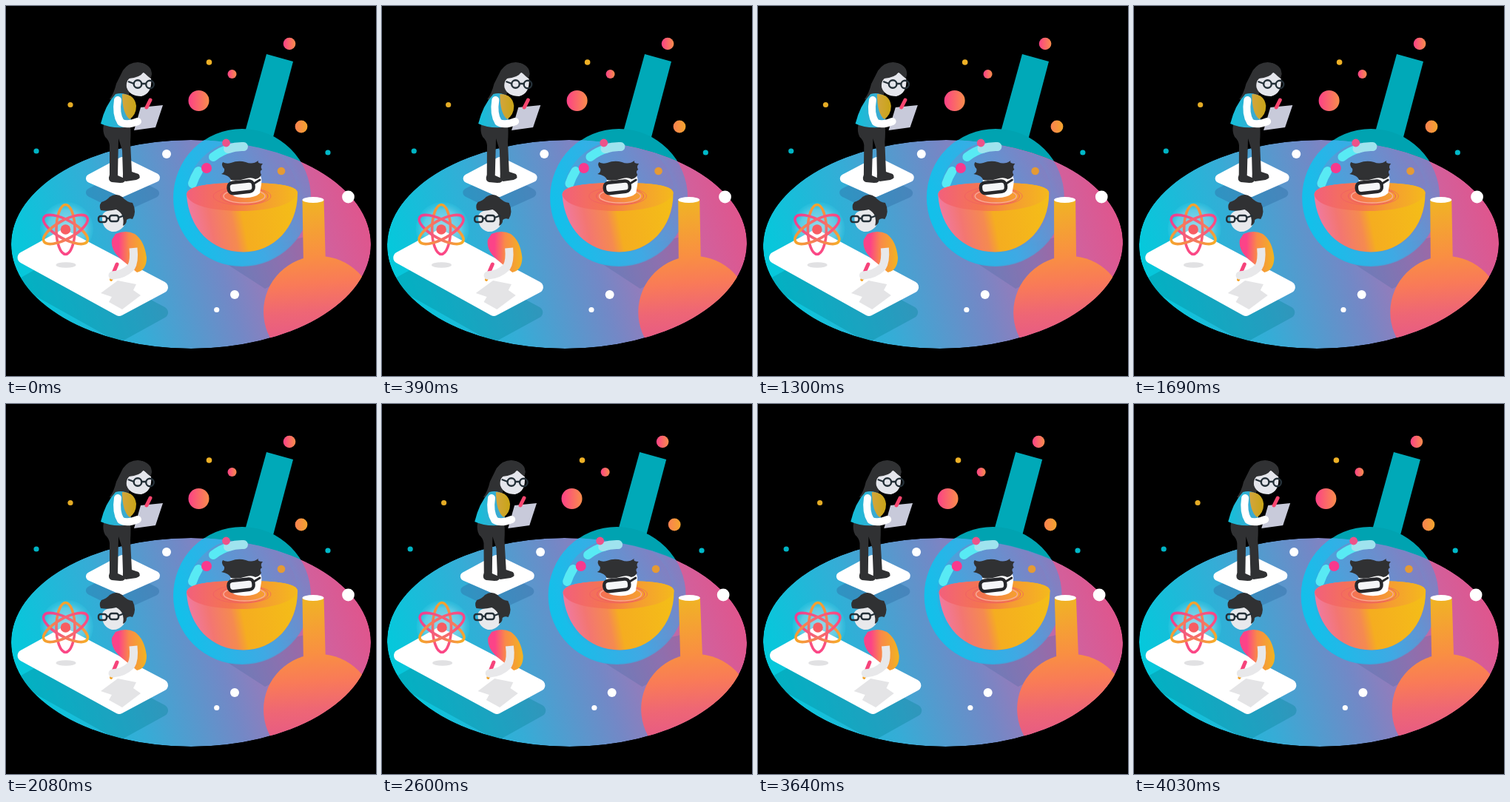
Recreate the animation shown at these times as an HTML page. Size 500x500 px, loop 4.16 s.

```html
<!DOCTYPE html>
<html lang="en">
<head>
<meta charset="utf-8">
<title>Laboratory</title>
<style>
html, body { margin: 0; width: 100%; height: 100%; overflow: hidden; background: #000; }
svg { display: block; width: 100vw; height: 100vh; }
.dark { fill: #303133; }
.rim { fill: none; stroke: #243038; }
.round { stroke-linecap: round; stroke-linejoin: round; }
.line { fill: none; stroke-linecap: round; stroke-linejoin: round; }
</style>
</head>
<body>
<svg viewBox="0 0 500 500">
  <defs>
    <linearGradient id="floor" gradientUnits="userSpaceOnUse" x1="15" y1="380" x2="470" y2="230">
      <stop offset="0" stop-color="#00cbdc"/>
      <stop offset=".3" stop-color="#36acd6"/>
      <stop offset=".56" stop-color="#7388c6"/>
      <stop offset=".74" stop-color="#a974b4"/>
      <stop offset=".87" stop-color="#d2609c"/>
      <stop offset="1" stop-color="#e0558c"/>
    </linearGradient>
    <linearGradient id="glass" gradientUnits="userSpaceOnUse" x1="240" y1="300" x2="395" y2="205">
      <stop offset="0" stop-color="#16bce9"/>
      <stop offset=".4" stop-color="#4aa2dc" stop-opacity=".9"/>
      <stop offset="1" stop-color="#7483c8" stop-opacity=".75"/>
    </linearGradient>
    <linearGradient id="ring" gradientUnits="userSpaceOnUse" x1="235" y1="285" x2="400" y2="235">
      <stop offset="0" stop-color="#13c0ea"/>
      <stop offset=".55" stop-color="#3fa9e4"/>
      <stop offset="1" stop-color="#6890d0" stop-opacity=".1"/>
    </linearGradient>
    <linearGradient id="liquid" gradientUnits="userSpaceOnUse" x1="246" y1="290" x2="390" y2="262">
      <stop offset="0" stop-color="#f07aa6"/>
      <stop offset=".2" stop-color="#f37672"/>
      <stop offset=".4" stop-color="#f58a50"/>
      <stop offset=".5" stop-color="#f5ad20"/>
      <stop offset="1" stop-color="#f4bd18"/>
    </linearGradient>
    <linearGradient id="surface">
      <stop offset="0" stop-color="#f2607c"/>
      <stop offset=".4" stop-color="#f4764e"/>
      <stop offset=".65" stop-color="#f59a34"/>
      <stop offset="1" stop-color="#f4b91c"/>
    </linearGradient>
    <linearGradient id="flask" gradientUnits="userSpaceOnUse" x1="410" y1="262" x2="425" y2="450">
      <stop offset="0" stop-color="#f0b424"/>
      <stop offset=".4" stop-color="#f98f42"/>
      <stop offset=".6" stop-color="#f97a58"/>
      <stop offset=".8" stop-color="#ee6675"/>
      <stop offset="1" stop-color="#e65a86"/>
    </linearGradient>
    <linearGradient id="warm">
      <stop offset="0" stop-color="#fc4187"/>
      <stop offset="1" stop-color="#f98d4c"/>
    </linearGradient>
    <linearGradient id="amber">
      <stop offset="0" stop-color="#fa8152"/>
      <stop offset="1" stop-color="#f4a52c"/>
    </linearGradient>
    <linearGradient id="shirt">
      <stop offset=".2" stop-color="#fc4388"/>
      <stop offset=".5" stop-color="#f98a48"/>
      <stop offset="1" stop-color="#f1b420"/>
    </linearGradient>
    <linearGradient id="vest">
      <stop offset="0" stop-color="#d3a53e"/>
      <stop offset="1" stop-color="#c9a516"/>
    </linearGradient>
    <linearGradient id="coat">
      <stop offset="0" stop-color="#12c0da"/>
      <stop offset="1" stop-color="#46a5cf"/>
    </linearGradient>
    <linearGradient id="orbit" gradientUnits="userSpaceOnUse" x1="46" y1="0" x2="114" y2="0">
      <stop offset="0" stop-color="#f5a52b"/>
      <stop offset=".5" stop-color="#f66b6c"/>
      <stop offset="1" stop-color="#fb4687"/>
    </linearGradient>
    <linearGradient id="orbit2" gradientUnits="userSpaceOnUse" x1="46" y1="0" x2="114" y2="0">
      <stop offset="0" stop-color="#ee3d92"/>
      <stop offset=".5" stop-color="#f56178"/>
      <stop offset="1" stop-color="#f6ac28"/>
    </linearGradient>
    <radialGradient id="glow">
      <stop offset="0" stop-color="#b4e2ee" stop-opacity=".85"/>
      <stop offset=".7" stop-color="#7fd6ea" stop-opacity=".65"/>
      <stop offset="1" stop-color="#2fc6e2" stop-opacity=".3"/>
    </radialGradient>
    <clipPath id="disc"><ellipse cx="250" cy="322" rx="243" ry="141"/></clipPath>
  </defs>
  <rect width="500" height="500"/>

  <!-- tall flask behind the disc -->
  <path data-m="5.4 0" fill="#00a9b8" d="M352 65L388 75L360 181L320 181Z"/>
  <circle data-m="2.3 0" cx="319" cy="259" r="93" fill="#00a3b1"/>

  <!-- disc with shadows -->
  <g data-m="0 .034" clip-path="url(#disc)">
    <ellipse cx="250" cy="322" rx="243" ry="141" fill="url(#floor)"/>
    <g class="round" opacity=".32">
      <path fill="#007f90" stroke="#007f90" stroke-width="16" d="M24 374L78 344L211 414L153 446Z"/>
    </g>
    <g class="round" opacity=".42">
      <path fill="#2f6fa5" stroke="#2f6fa5" stroke-width="12" d="M114 252L157 230L201 253L157 273Z"/>
    </g>
    <path fill="#47659f" opacity=".28" d="M285 340L350 382L412 352L404 312Z"/>
  </g>

  <!-- round bowl -->
  <g data-m="2 0">
    <g clip-path="url(#disc)">
      <circle cx="319" cy="259" r="93" fill="url(#glass)"/>
    </g>
    <circle cx="319" cy="258" r="84" fill="none" stroke="url(#ring)" stroke-width="17" clip-path="url(#disc)"/>
  </g>
  <g data-m="2.6 0" class="line" stroke="#58eaf4" stroke-width="12">
    <path d="M252 240Q255 231 260 223"/>
    <path d="M280 204Q290 196 303 192.5"/>
    <path d="M300 193Q311 189.5 321 190" stroke="#9fe3ee"/>
  </g>
  <g data-m="-.8 0">
    <path fill="url(#liquid)" d="M244 255C244 242 280 239 319 239S394 241 394 253C394 300 361 332.500 321 332.500C277 332.500 247 300 244 255Z"/>
    <path fill="url(#surface)" d="M244 255C244 242 280 239 319 239S394 241 394 253C390 268 356 277 319 277S248 271 244 255Z"/>
    <g fill="none" stroke="#ee5a66">
      <ellipse cx="319" cy="257" rx="39" ry="12" opacity=".6"/>
      <ellipse cx="322" cy="257" rx="28" ry="9" stroke="#f9a79a" stroke-width="1.5"/>
      <ellipse cx="322" cy="257" rx="32" ry="11"/>
    </g>
  </g>
  <g data-m=".4 0">
    <path fill="#fff" d="M304 230L341 226Q347 231 345 241L343 253Q336 260 319 259Q305 258 302 251Z"/>
    <path class="dark" d="M304 235Q302 229 291 227Q296 225 295 220Q290 215 293 211Q298 214 304 212Q314 208 324 211Q333 215 341 209Q339 213 347 213Q343 217 346 221Q342 223 345 228Q343 233 337 234Q332 231 325 233Q313 237 304 235Z"/>
    <rect x="300.500" y="237.500" width="34" height="14.500" rx="6" fill="#f5f6f8" stroke="#26272b" stroke-width="4.500" transform="rotate(-6 318 244)"/>
    <path class="line" stroke="#26272b" stroke-width="3" d="M335 240L343 235"/>
  </g>

  <!-- front flask -->
  <g data-m="0 .034" clip-path="url(#disc)">
    <g data-m="-1.5 -.017" fill="url(#flask)">
      <circle cx="423" cy="413" r="75"/>
      <path d="M400.5 262H429.5L432 350H402Z"/>
      <ellipse cx="415" cy="262" rx="14.500" ry="4" fill="#fff"/>
    </g>
  </g>

  <!-- standing figure -->
  <path data-m="0 .034" fill="#fff" class="round" stroke="#fff" stroke-width="12" d="M114 233L157 210L202 232L157 252Z"/>
  <g data-m="2.1 .011">
    <path class="dark" d="M132 160L168 160Q169 170 168 184L170 224L179 227Q184 232 176 235L162 237Q157 235 158 227L157 195L152 179L151 229L160 233Q163 239 154 239L143 238Q137 236 140 228L140 188Q139 181 134 177Q130 170 132 160Z"/>
    <path class="dark" d="M158 87Q166 76 178 76Q194 77 197 92Q194 102 182 101Q170 106 165 122Q154 128 140 126Q146 118 149 105Z"/>
    <path fill="url(#coat)" d="M148 119Q160 116 168 123L169 163Q145 167 128 159Q134 134 148 119Z"/>
    <path fill="url(#vest)" d="M157 119Q174 119 176 135Q176 147 167 153Q157 145 157 119Z"/>
    <path fill="#e5e6ec" d="M166 98Q181 97 186 89Q193 97 196 98Q198 118 183 122Q167 122 163 110Q162 103 166 98Z"/>
    <path class="dark" d="M161 106Q165 94 186 90L196 97Q200 82 184 77Q163 76 157 94Z"/>
    <g class="rim" stroke-width="2.4">
      <circle cx="178" cy="105.500" r="5.300"/><circle cx="194.500" cy="106" r="5.300"/>
      <path d="M183 105H189M173 105L165 102"/>
    </g>
    <path fill="#c8cada" d="M182 137L212 134L202 164L173 168Z"/>
    <path class="line" stroke="#f9466f" stroke-width="5" d="M195 127L190 137"/>
    <path class="line" stroke="#fff" stroke-width="10" d="M151 127Q148 146 155 157Q163 162 178 156"/>
  </g>

  <!-- table and atom -->
  <g data-m="-.7 0"><circle cx="82" cy="301" r="36" fill="url(#glow)"/></g>
  <g data-m="0 .034">
    <path fill="#fff" class="round" stroke="#fff" stroke-width="16" d="M23.5 340L78 310L211 380L153 411Z"/>
    <ellipse cx="81" cy="350" rx="13.500" ry="3.800" fill="#e1e1e3"/>
    <path fill="#e4e4e6" d="M128 388L151 371L176 376L172 384L182 391L157 410L139 400L143 393Z"/>
  </g>
  <g data-m="-.7 0">
    <g id="atom" fill="none" stroke-width="3.6"></g>
    <circle cx="80.500" cy="302" r="6.800" fill="#f75d62"/>
  </g>

  <!-- seated figure -->
  <g data-m="-.5 .028">
    <path fill="url(#shirt)" d="M148 308Q162 302 174 308Q187 317 190 340Q190 357 177 360L160 346Q141 332 143 316Z"/>
    <path fill="#e8e9ec" d="M130 284Q131 276 148 275L161 272Q165 287 159 298Q152 306 143 305Q129 301 130 284Z"/>
    <path class="dark" d="M128 276Q125 270 129 265Q136 263 140 258Q149 252 157 258Q163 265 171 266Q177 278 171 288Q166 286 163 289Q163 295 158 297Q161 281 149 275Q138 278 128 276Z"/>
    <g class="rim" stroke-width="2.4">
      <rect x="125" y="284" width="11" height="8" rx="3"/>
      <rect x="140" y="283" width="12" height="8" rx="3"/>
      <path d="M136 287H140M152 286L160 283"/>
    </g>
    <path class="line" stroke="#f2a32a" stroke-width="4" d="M145 362L142 370"/>
    <path class="line" stroke="#f6437b" stroke-width="5" d="M150 349L145 361"/>
    <path fill="none" stroke="#e8e8ea" stroke-width="11" stroke-linejoin="round" d="M172 327Q174 345 169 353Q159 363 144 364"/>
    <circle cx="144" cy="364" r="5.500" fill="#e8e8ea"/>
  </g>

  <g id="dots"></g>
</svg>
<script>
const LOOP = 4160, STEP = 130, HORIZON = 322;
const NS = "http://www.w3.org/2000/svg";

function add(parent, tag, attrs) {
  const el = document.createElementNS(NS, tag);
  for (const name in attrs) el.setAttribute(name, attrs[name]);
  document.getElementById(parent).appendChild(el);
}

// x, y, radius, fill, sway
const dots = [
  [383, 51, 8.3, "url(#warm)", 5.5],
  [305.5, 92, 6, "url(#warm)", 5.5],
  [260.5, 128, 14, "url(#warm)", 5.6],
  [399, 163, 8.4, "url(#amber)", 5.4],
  [274.5, 76, 3.8, "#efb126", 5.6],
  [87, 133.5, 3.6, "#e5ac25", 4.8],
  [41, 196, 3.6, "#00b4c4", 4],
  [435, 198, 3.6, "#00b9c9", 4.2],
  [297.5, 185, 5.4, "#ed5389", 4],
  [271, 219, 7, "#f9398d", 3.2],
  [372, 223, 5.3, "#e59a35", 2.8],
  [217, 200, 6, "#fff", 4.1],
  [462.5, 258, 8.4, "#fff", 1.9],
  [309, 390, 6, "#fff", -2.4],
  [284.7, 410.5, 3.6, "#fff", -3.1]
];
for (const [cx, cy, r, fill, sway] of dots)
  add("dots", "circle", { cx, cy, r, fill, "data-m": sway + " 0" });

for (const [turn, ink] of [[90, "orbit"], [29, "orbit2"], [-29, "orbit"]])
  add("atom", "ellipse", {
    cx: 80.5, cy: 302, rx: 33.5, ry: 12.5,
    stroke: `url(#${ink})`, transform: `rotate(${turn} 80.5 302)`
  });

// Each part shifts by "a" and leans by "k" about the horizon.
const parts = [...document.querySelectorAll("[data-m]")].map(el => {
  const [a, k] = el.dataset.m.split(" ").map(Number);
  return { el, a, k };
});

function draw() {
  const t = Math.floor(performance.now() % LOOP / STEP) * STEP;
  const s = Math.sin(2 * Math.PI * t / LOOP);
  for (const { el, a, k } of parts) {
    const lean = -k * s, shift = s * (a + k * HORIZON);
    el.setAttribute("transform", `matrix(1 0 ${lean.toFixed(5)} 1 ${shift.toFixed(3)} 0)`);
  }
  requestAnimationFrame(draw);
}
draw();
</script>
</body>
</html>
```
